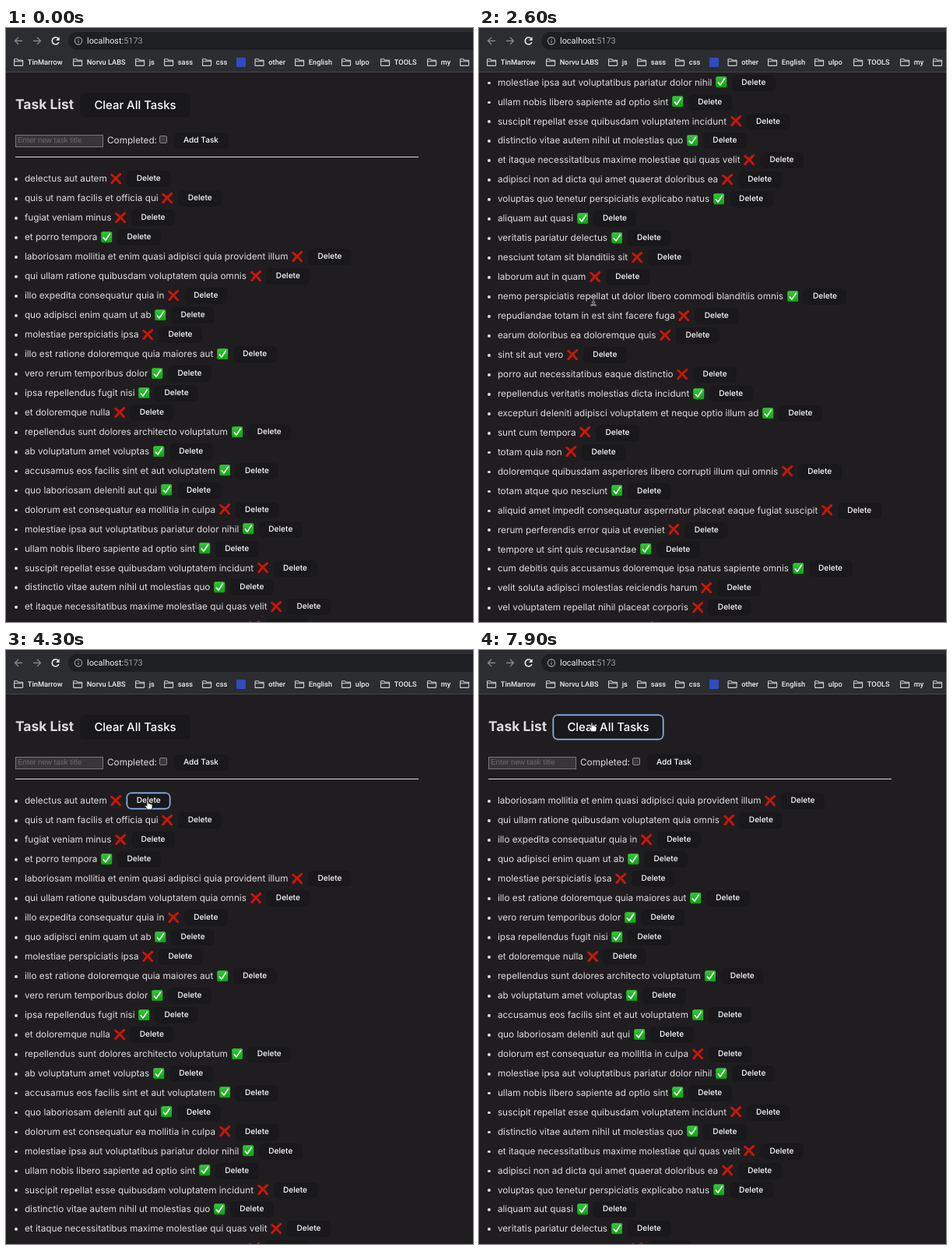
Animation, 600 px wide and 762 px high, one loop 8 s. Source, as an HTML page:

```html
<!DOCTYPE html>
<html lang="en">
<head>
<meta charset="utf-8">
<title>Task List</title>
<style>
  html, body { margin: 0; width: 100%; height: 100%; overflow: hidden; background: #201d20; }
  #stage { position: relative; width: 600px; height: 762px; overflow: hidden; background: #201d20;
    color: #dddcdd; font: 11.75px/16px Inter, sans-serif; white-space: nowrap; text-rendering: geometricPrecision; }
  #page, .at, #chrome, #status, #cursor { position: absolute; }
  #page { left: 0; top: 0; width: 600px; }
  .btn { box-sizing: border-box; border-radius: 6px; background: #19181a; color: #fff;
    font-weight: 500; font-size: 10.15px; text-align: center; width: 56px; height: 21px; line-height: 21px; }
  .focus { box-shadow: 0 0 0 .5px #8cb6ee, inset 0 0 0 1.2px #8cb6ee; }
  h1 { margin: 0; left: 12px; top: 87px; font-size: 17.4px; line-height: 24px; font-weight: 700; }
  #clear { left: 95px; top: 83px; width: 142px; height: 32px; line-height: 32px; font-size: 14.9px; }
  #title { left: 12px; top: 137px; width: 113px; height: 16px; box-sizing: border-box; padding-left: 2px;
    border: 1px solid #79777a; background: #373538; color: #6c6a6d;
    font: 9.76px/14px "Liberation Sans", Arial, sans-serif; }
  #check { left: 197px; top: 138px; width: 10px; height: 10px; box-sizing: border-box;
    border: 1px solid #858386; border-radius: 2px; background: #3a383b; }
  #add { left: 215.5px; top: 134px; width: 70px; }
  #rule { left: 12px; top: 165px; width: 518px; height: 1px; background: #d8d7d8; }
  ul { list-style: none; margin: 0; padding: 0; left: 0; top: 181px; }
  li { position: relative; height: 24.96px; padding-left: 23.9px; display: flex; align-items: center; }
  li::before { content: ""; position: absolute; left: 11.2px; top: 11.4px; width: 3.8px; height: 3.8px;
    border-radius: 50%; background: #dddcdd; }
  li svg { width: 14.6px; height: 14.6px; margin: 0 6.2px 0 4.7px; }
  li .btn { position: relative; top: .5px; }
  #chrome { left: 0; top: 0; }
  #chrome text { font: 500 9.25px Roboto, sans-serif; fill: #eceef0; }
  #chrome .url { font-size: 10.9px; font-weight: 400; }
  #status { left: 0; top: 752px; width: 188px; height: 12px; padding-left: 3px; border-radius: 0 3px 0 0;
    background: #29272a; color: #79787b; font: 9.35px/13px Roboto, sans-serif; }
  #cursor { left: 0; top: 0; overflow: visible; }
</style>
</head>
<body>
<div id="stage">
  <div id="page">
    <h1 class="at">Task List</h1>
    <div class="at btn" id="clear">Clear All Tasks</div>
    <div class="at" id="title">Enter new task title</div>
    <div class="at" style="left:130px;top:136px">Completed:</div>
    <div class="at" id="check"></div>
    <div class="at btn" id="add">Add Task</div>
    <div class="at" id="rule"></div>
    <ul class="at" id="list"></ul>
  </div>

  <svg id="chrome" width="600" height="58">
    <defs>
      <path id="folder" d="M1 .7H4.4L5.7 2.2H11Q11.6 2.2 11.6 2.8V8.8Q11.6 9.4 11 9.4H1.2Q.6 9.4 .6 8.8V1.2Q.6 .7 1 .7ZM.6 3.8H11.6"
        fill="none" stroke="#cfd1d4" stroke-width="1.1"/>
      <linearGradient id="green" x2="0" y2="1">
        <stop stop-color="#35c83a"/><stop offset="1" stop-color="#0ba40f"/>
      </linearGradient>
      <symbol id="yes" viewBox="0 0 16 16">
        <rect x=".2" y=".2" width="15.6" height="15.6" rx="2.6" fill="url(#green)"/>
        <path d="M3.6 8.8L6.6 12.2L12.4 3.6" fill="none" stroke="#fff" stroke-width="1.9" stroke-linecap="round" stroke-linejoin="round"/>
      </symbol>
      <symbol id="no" viewBox="0 0 16 16">
        <path d="M1.9 2.6Q8.6 7.2 13.8 14.2M14 1.7Q7 7 2 14" fill="none" stroke="#c81707" stroke-width="3.3" stroke-linecap="round"/>
      </symbol>
      <path id="stem" d="M-2.6 -5.6Q0 -5.4 0 -3.6V3.6Q0 5.4 -2.6 5.6M2.6 -5.6Q0 -5.4 0 -3.6V3.6Q0 5.4 2.6 5.6M-1.3 1.8H1.3"/>
    </defs>
    <rect width="600" height="57" fill="#2c2d30"/>
    <rect y="56" width="600" height="1" fill="#434447"/>
    <rect x="80" y="5" width="540" height="23" rx="11.5" fill="#1e1f22"/>
    <g fill="none" stroke="#85868a" stroke-width="1.3">
      <path d="M21 16.5H11.5M16 12L11.5 16.5L16 21"/>
      <path d="M35 16.5H44.5M40 12L44.5 16.5L40 21"/>
      <path d="M67 13.4A4.5 4.5 0 1 0 67.9 18.2" stroke="#eceef0" stroke-width="1.6"/>
      <circle cx="93" cy="16.5" r="4.6" stroke="#a0a3a8" stroke-width="1.1"/>
      <path d="M93 16V19M93 13.8V15" stroke="#a0a3a8" stroke-width="1.1"/>
    </g>
    <path d="M68.6 11.4V16H64Z" fill="#eceef0"/>
    <text class="url" x="104" y="20.4">localhost:<tspan fill="#9aa0a6">5173</tspan></text>
    <rect x="296" y="38" width="12" height="12" rx="1" fill="#2f4cc0"/>
    <g id="marks"></g>
  </svg>

  <div id="status">Waiting for jsonplaceholder.typicode.com...</div>

  <svg id="cursor" width="1" height="1">
    <path id="arrow" d="M0 0V10.5L2.5 8.3L4.2 12L6 11.2L4.4 7.6H7.6Z" fill="#111" stroke="#fff"/>
    <g id="beam" fill="none" stroke-linecap="round">
      <use href="#stem" stroke="#e8e8e8" stroke-width="2"/>
      <use href="#stem" stroke="#222" stroke-width=".8"/>
    </g>
    <path id="hand" d="M-1 .6Q0 -.8 1 .6V4Q2 3.3 2.8 4.3Q3.8 3.8 4.5 4.8Q6 4.4 6 6.2V8.4Q6 10 5 11.8H-.6Q-1.4 9.8 -3.4 7.2Q-3.6 5.6 -2 6.2L-1 7.2Z" fill="#fff" stroke="#111" stroke-width=".8"/>
  </svg>
</div>

<script>
const LOOP = 8000, STEP = 100;
const $ = id => document.getElementById(id);

// A leading "+" marks a completed task.
const tasks = `delectus aut autem
quis ut nam facilis et officia qui
fugiat veniam minus
+et porro tempora
laboriosam mollitia et enim quasi adipisci quia provident illum
qui ullam ratione quibusdam voluptatem quia omnis
illo expedita consequatur quia in
+quo adipisci enim quam ut ab
molestiae perspiciatis ipsa
+illo est ratione doloremque quia maiores aut
+vero rerum temporibus dolor
+ipsa repellendus fugit nisi
et doloremque nulla
+repellendus sunt dolores architecto voluptatum
+ab voluptatum amet voluptas
+accusamus eos facilis sint et aut voluptatem
+quo laboriosam deleniti aut qui
dolorum est consequatur ea mollitia in culpa
+molestiae ipsa aut voluptatibus pariatur dolor nihil
+ullam nobis libero sapiente ad optio sint
suscipit repellat esse quibusdam voluptatem incidunt
+distinctio vitae autem nihil ut molestias quo
et itaque necessitatibus maxime molestiae qui quas velit
adipisci non ad dicta qui amet quaerat doloribus ea
+voluptas quo tenetur perspiciatis explicabo natus
+aliquam aut quasi
+veritatis pariatur delectus
nesciunt totam sit blanditiis sit
laborum aut in quam
+nemo perspiciatis repellat ut dolor libero commodi blanditiis omnis
repudiandae totam in est sint facere fuga
earum doloribus ea doloremque quis
sint sit aut vero
porro aut necessitatibus eaque distinctio
+repellendus veritatis molestias dicta incidunt
+excepturi deleniti adipisci voluptatem et neque optio illum ad
sunt cum tempora
totam quia non
doloremque quibusdam asperiores libero corrupti illum qui omnis
+totam atque quo nesciunt
aliquid amet impedit consequatur aspernatur placeat eaque fugiat suscipit
rerum perferendis error quia ut eveniet
+tempore ut sint quis recusandae
+cum debitis quis accusamus doloremque ipsa natus sapiente omnis
velit soluta adipisci molestias reiciendis harum
vel voluptatem repellat nihil placeat corporis
nam qui rerum fugiat accusamus
+sit reprehenderit omnis quia
ut necessitatibus aut maiores debitis officia blanditiis velit et
+cupiditate necessitatibus ullam aut quis dolor voluptate
distinctio exercitationem ab doloribus
nesciunt dolorum quis recusandae ad pariatur ratione
+qui labore est occaecati recusandae aliquid quam
quis et est ut voluptate quam dolor`.split('\n');

$('list').innerHTML = tasks.map(s => {
  const done = s[0] === '+';
  return `<li><span>${done ? s.slice(1) : s}</span><svg><use href="#${done ? 'yes' : 'no'}"/></svg><div class="btn">Delete</div></li>`;
}).join('');
const rows = [...$('list').children];

const bookmarks = [[10, 'TinMarrow'], [86, 'Norvu LABS'], [166, 'js'], [203, 'sass'], [252, 'css'],
  [319.5, 'other'], [371, 'English'], [431, 'ulpo'], [481, 'TOOLS'], [541, 'my'], [583, '']];
$('marks').innerHTML = bookmarks.map(([x, name]) =>
  `<use href="#folder" x="${x}" y="39"/><text x="${x + 17.8}" y="47.4">${name}</text>`).join('');

// row, click time, removal time
const deletions = [[0, 4200, 4500], [1, 5000, 5300], [3, 6000, 6500], [2, 6800, 7000]];

// time, offset
const scroll = [[2100, 0], [2300, 190], [2600, 573], [2800, 690], [2900, 640], [3300, 40],
  [3400, -25], [3600, -8], [3800, 0]];

// time, x, y, shape from then on
const path = [[300, 590, 330, 'arrow'], [1000, 67, 18, 'arrow'], [1700, 67, 18, 'arrow'],
  [1800, 76, 60, 'arrow'], [2100, 147, 350, 'beam'], [3700, 147, 350, 'beam'],
  [4100, 182, 193, 'hand'], [4500, 182, 193, 'arrow'], [4900, 246, 193, 'hand'],
  [5400, 246, 193, 'arrow'], [5900, 171, 219, 'hand'], [6500, 171, 219, 'arrow'],
  [6700, 186, 193, 'hand'], [7100, 186, 193, 'arrow'], [7500, 145, 93, 'hand']];

function sample(keys, t, col) {
  const i = keys.findIndex(k => k[0] > t);
  if (i === 0) return keys[0][col];
  if (i < 0) return keys[keys.length - 1][col];
  const a = keys[i - 1], b = keys[i];
  return a[col] + (b[col] - a[col]) * (t - a[0]) / (b[0] - a[0]);
}

const between = (t, from, to) => t >= from && t < to;

function draw(t) {
  $('page').style.transform = `translateY(${-sample(scroll, t, 1)}px)`;
  $('list').style.display = between(t, 1300, 1400) ? 'none' : '';
  $('status').style.display = between(t, 1300, 1700) ? '' : 'none';
  for (const [i, click, gone] of deletions) {
    rows[i].style.display = t >= gone ? 'none' : '';
    rows[i].lastChild.classList.toggle('focus', between(t, click, gone));
  }
  $('clear').classList.toggle('focus', t >= 7700);

  const key = path.filter(k => k[0] <= t).pop();
  for (const id of ['arrow', 'beam', 'hand'])
    $(id).style.display = key && key[3] === id ? '' : 'none';
  $('cursor').style.transform = `translate(${sample(path, t, 1)}px, ${sample(path, t, 2)}px)`;
}

function tick() {
  const t = performance.now() % LOOP;
  draw(Math.floor(t / STEP) * STEP);
  requestAnimationFrame(tick);
}
tick();
</script>
</body>
</html>
```
